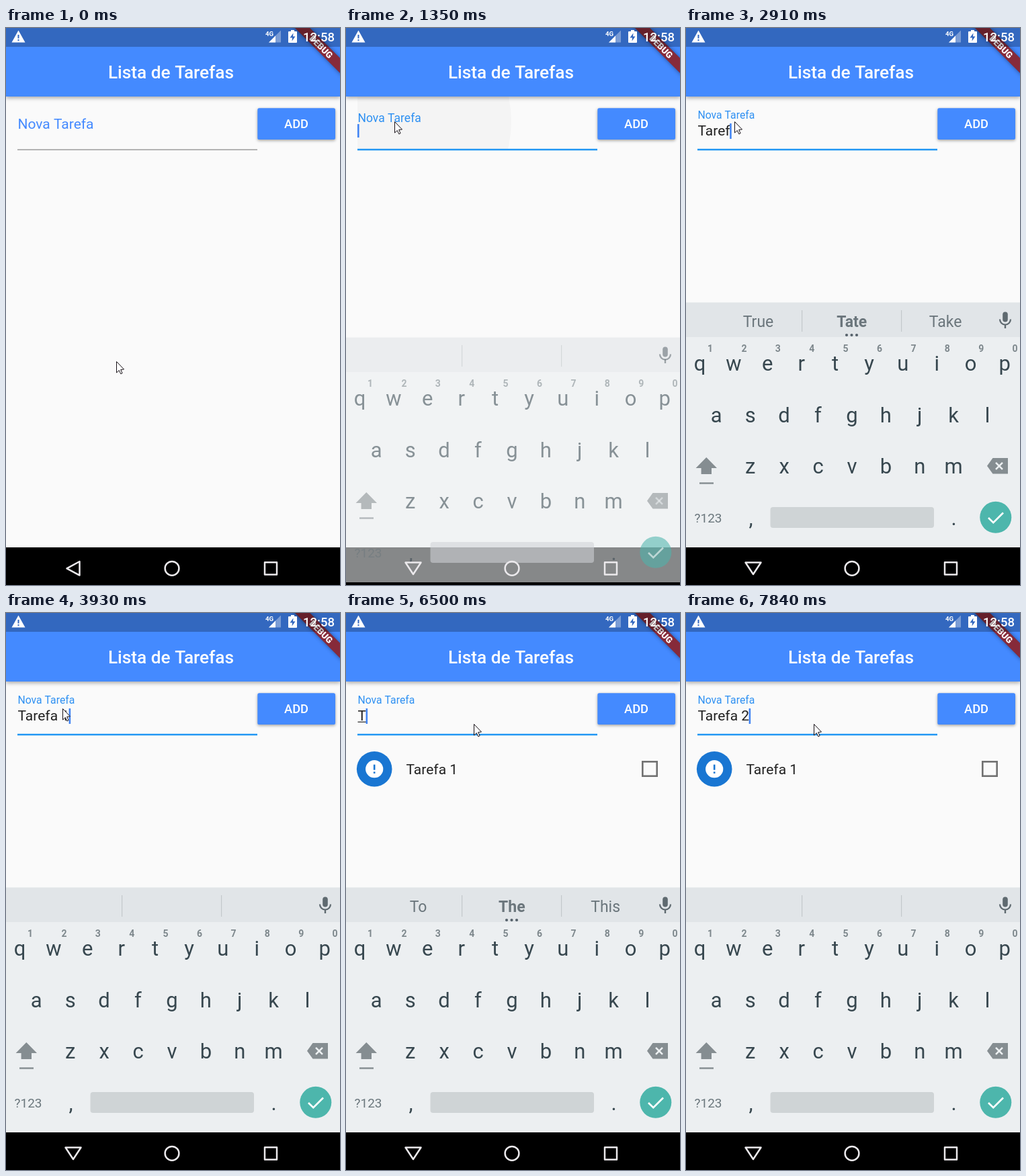
These frames come from a looping animation (497x829 px, 8 s). An HTML page with a canvas:

```html
<!DOCTYPE html>
<html lang="pt">
<head>
<meta charset="utf-8">
<title>Lista de Tarefas</title>
<style>
html, body { margin: 0; width: 100%; height: 100%; overflow: hidden; background: #fafafa; }
canvas { display: block; width: 497px; height: 829px; }
</style>
</head>
<body>
<canvas id="stage"></canvas>
<script>
const W = 497, H = 829, LOOP = 8000;
const canvas = document.getElementById('stage');
const ctx = canvas.getContext('2d');
const dpr = window.devicePixelRatio || 1;
canvas.width = Math.round(W * dpr);
canvas.height = Math.round(H * dpr);

const ACCENT = '#448aff', LINE = '#2196f3', INK = 'rgba(0,0,0,0.87)';
const KEY_INK = '#37474f', KEY_GREY = '#858d91';

// [time, typed text, underlined while composing]
const TYPING = [
  [0, ''], [2360, 'T'], [2440, 'T', 1], [2520, 'Ta', 1], [2680, 'Tar'], [2830, 'Tare'],
  [2910, 'Taref'], [3060, 'Tarefa'], [3230, 'Tarefa', 1], [3300, 'Tarefa '], [3480, 'Tarefa 1'],
  [5110, ''], [6350, 'T'], [6500, 'T', 1], [6670, 'Ta', 1], [6830, 'Tar', 1], [6980, 'Tare', 1],
  [7140, 'Taref', 1], [7290, 'Tarefa', 1], [7600, 'Tarefa '], [7750, 'Tarefa 2']
];
const T_WORDS = 'To The This', TA_WORDS = 'True Tate Take', LAST_WORDS = 'Tarefa Tarda Targets';
const HINTS = [
  [0, ''], [2440, T_WORDS], [2600, TA_WORDS], [3060, 'Tarde Tare Tart'], [3230, LAST_WORDS], [3530, ''],
  [6500, T_WORDS], [6750, TA_WORDS], [7370, LAST_WORDS], [7840, '']
];
const CARET_ON = [[1280, 1660], [2210, 4030], [4530, 4960], [5510, 5890], [6350, LOOP]];
// start, end, steps, target x, target y, dip
const MOVES = [
  [330, 640, 5, 74, 178, 0], [800, 870, 2, 72, 139, 0],
  [3930, 4550, 9, 434, 150, 9], [5510, 5740, 4, 190, 165, 0]
];

const latest = (list, t) => list.filter(e => e[0] <= t).pop();
const mix = (a, b, p) => a + (b - a) * p;
const smooth = p => p * p * (3 - 2 * p);

function stepped(t, start, end, n) {
  if (t < start) return 0;
  return Math.min(n, Math.floor((t - start) / (end - start) * (n - 1) + 1e-6) + 1) / n;
}

function rect(x, y, w, h, fill, r = 0) {
  ctx.fillStyle = fill;
  ctx.beginPath();
  ctx.roundRect(x, y, w, h, r);
  ctx.fill();
}

function disc(x, y, r, fill) {
  ctx.fillStyle = fill;
  ctx.beginPath();
  ctx.arc(x, y, r, 0, Math.PI * 2);
  ctx.fill();
}

function path(points, closed = true) {
  ctx.beginPath();
  for (let i = 0; i < points.length; i += 2) ctx.lineTo(points[i], points[i + 1]);
  if (closed) ctx.closePath();
}

function poly(points, fill) {
  path(points);
  ctx.fillStyle = fill;
  ctx.fill();
}

function line(points, color, width, closed = false) {
  path(points, closed);
  ctx.strokeStyle = color;
  ctx.lineWidth = width;
  ctx.stroke();
}

function text(s, x, y, size, color, weight = 400, align = 'left') {
  ctx.font = `${weight} ${size}px Roboto, sans-serif`;
  ctx.textAlign = align;
  ctx.fillStyle = color;
  ctx.fillText(s, x, y);
}

function shadowed(alpha, blur, dy, draw) {
  ctx.save();
  ctx.shadowColor = `rgba(0,0,0,${alpha})`;
  ctx.shadowBlur = blur * dpr;
  ctx.shadowOffsetY = dy * dpr;
  draw();
  ctx.restore();
}

function banner() {
  ctx.save();
  ctx.translate(W, 0);
  ctx.rotate(Math.PI / 4);
  shadowed(0.5, 6, 0, () => rect(-52, 31.8, 104, 15.4, 'rgba(125,36,53,0.9)'));
  rect(-52, 31.8, 104, 15.4, '#862a3a');
  text('DEBUG', 0, 44.2, 13.2, '#fff', 900, 'center');
  ctx.restore();
}

function header() {
  shadowed(0.35, 6, 2, () => rect(0, 0, W, 102, ACCENT));
  text('Lista de Tarefas', 245.5, 75, 26.2, '#fff', 500, 'center');
  banner();
  rect(0, 0, W, 28, 'rgba(0,0,0,0.25)');

  const bar = '#3367bf';
  poly([18.5, 3.5, 28.5, 21.5, 8.5, 21.5], '#fff');
  rect(17.5, 10, 2, 5.5, bar);
  rect(17.5, 17, 2, 2, bar);
  poly([391, 21.5, 409, 21.5, 409, 3.5], 'rgba(255,255,255,0.35)');
  poly([391, 21.5, 401, 21.5, 401, 11.5], '#fff');
  text('4G', 386, 12, 9.6, '#fff', 700);
  rect(420, 5, 13, 17, '#fff', 1);
  rect(424, 3, 5, 3, '#fff');
  poly([427.5, 7.5, 422.5, 14.5, 426, 14.5, 425.5, 19.5, 430.5, 12.5, 427, 12.5], bar);
  text('12:58', 442, 20, 18.5, '#fff', 500);
}

function ripple(t) {
  if (t < 1040 || t >= 1510) return;
  const r = t < 1110 ? 8 : t < 1280 ? 12 : 174 + (t - 1350) * 1.2;
  ctx.save();
  ctx.beginPath();
  ctx.rect(17, 102, 357, 78);
  ctx.clip();
  disc(72, 139, r, `rgba(0,0,0,${t < 1430 ? 0.022 : 0.011})`);
  ctx.restore();
}

function field(t, now) {
  ripple(now);
  const focused = now >= 1280;
  const p = !focused ? 0 : now < 1350 ? 0.1 : now < 1430 ? 0.66 : now < 1510 ? 0.96 : 1;
  text('Nova Tarefa', 17.5, mix(150, 134.5, p), mix(21, 15.75, p), focused ? '#2e90f2' : ACCENT);
  if (focused) rect(17, 179.8, 357, 2.4, LINE);
  else rect(17, 180.4, 357, 1.3, '#8a8a8a');

  const [, typed, composing] = latest(TYPING, t);
  text(typed, 17.5, 160, 21, INK);
  const width = ctx.measureText(typed).width;
  if (composing) rect(17.5, 161.6, width, 1.2, INK);
  if (CARET_ON.some(([a, b]) => t >= a && t < b)) {
    rect(17 + width, typed ? 142 : 143, 2.6, typed ? 23 : 20, '#4285f4');
  }
}

function button(t) {
  const pressed = t >= 4860 && t < 5190;
  const fill = t >= 4940 && t < 5190 ? '#5595ff' : ACCENT;
  shadowed(pressed ? 0.4 : 0.38, pressed ? 8 : 4, pressed ? 3 : 1.5,
    () => rect(374.3, 119.3, 115.7, 46.7, fill, 2.6));
  text('ADD', 432, 149.3, 18.3, '#fff', 500, 'center');
}

function task() {
  disc(42.2, 232.2, 26.3, '#1976d2');
  disc(42.2, 232.2, 13.1, '#fff');
  rect(40.9, 225.6, 2.6, 8, '#1976d2');
  rect(40.9, 236.2, 2.6, 2.6, '#1976d2');
  text('Tarefa 1', 89.5, 239.5, 21, INK);
  ctx.strokeStyle = '#717171';
  ctx.lineWidth = 2.6;
  ctx.strokeRect(441.3, 221.3, 21.4, 21.4);
}

function mic() {
  const c = '#5f6a70';
  rect(471.2, 422.5, 7.6, 15, c, 3.8);
  ctx.strokeStyle = c;
  ctx.lineWidth = 2.2;
  ctx.beginPath();
  ctx.arc(475, 433.5, 8, 0, Math.PI);
  ctx.stroke();
  rect(473.8, 441, 2.4, 6, c);
}

function keyRow(keys, x, y) {
  [...keys].forEach((k, i) => text(k, x + i * 50.4, y, 31, KEY_INK, 400, 'center'));
}

function hints(t) {
  const words = latest(HINTS, t)[1];
  if (!words) return;
  words.split(' ').forEach((w, i) =>
    text(w, 107.5 + i * 139.3, 445, 23, '#6b767c', i === 1 ? 700 : 400, 'center'));
  for (let i = 0; i < 3; i++) disc(239 + i * 7.5, 457, 2.1, '#55616a');
}

function keyboard(t, now) {
  if (now < 1350) return;
  const q = (1 - Math.min(1, (now - 1280) / 230)) ** 2;
  // a layer would be needed for true group opacity; key ink is close enough
  ctx.save();
  ctx.globalAlpha = 1 - 0.89 * q;
  ctx.translate(0, Math.round(107 * q));
  rect(0, 408.5, W, 52, '#e1e5e8');
  rect(0, 460.5, W, 312.5, '#eceff1');
  rect(172, 420, 1.2, 32, '#c3c8cb');
  rect(320, 420, 1.2, 32, '#c3c8cb');
  mic();
  hints(t);

  keyRow('qwertyuiop', 20.5, 510);
  keyRow('asdfghjkl', 45.3, 586.5);
  keyRow('zxcvbnm', 95.8, 663);
  for (let i = 0; i < 10; i++) {
    text((i + 1) % 10, 36 + i * 50.4, 482, 14, '#7d878c', 700, 'center');
  }

  poly([30.3, 639, 46, 655, 38, 655, 38, 664, 22.6, 664, 22.6, 655, 14.6, 655], KEY_GREY);
  rect(20, 676.3, 21, 2.4, KEY_GREY);
  poly([448, 651.8, 456.5, 640, 479, 640, 479, 663.6, 456.5, 663.6], KEY_GREY);
  line([461, 646.8, 471, 656.8], '#eceff1', 2.6);
  line([471, 646.8, 461, 656.8], '#eceff1', 2.6);

  text('?123', 33, 736, 19, '#6b777d', 400, 'center');
  text(',', 96.5, 740, 31, KEY_INK, 400, 'center');
  text('.', 398.5, 740, 31, KEY_INK, 400, 'center');
  rect(125.5, 713, 243.5, 31, '#cfd4d6', 4);
  disc(460.8, 728.3, 23.5, '#4db6ac');
  line([450, 729, 457.3, 736.2, 472, 721.5], '#fff', 2.7);
  ctx.restore();
}

function navIcons(now) {
  const c = '#ebe9ec';
  ctx.lineJoin = 'round';
  line(now < 1350 ? [90.5, 804.3, 109.5, 794, 109.5, 814.6]
    : [88.5, 795.5, 111.5, 795.5, 100, 813], c, 2.5, true);
  ctx.beginPath();
  ctx.arc(247, 804.3, 10.4, 0, Math.PI * 2);
  ctx.stroke();
  line([385, 795.3, 403, 795.3, 403, 813.5, 385, 813.5], c, 2.5, true);
  ctx.lineJoin = 'miter';
}

function pointer(t) {
  let x = 164, y = 496;
  for (const [start, end, n, toX, toY, dip] of MOVES) {
    const p = stepped(t, start, end, n), e = smooth(p);
    x = mix(x, toX, e);
    y = mix(y, toY, e) + dip * Math.sin(Math.PI * p);
  }
  ctx.save();
  ctx.translate(Math.round(x) + 0.5, Math.round(y) + 0.5);
  const arrow = [0, 0, 0, 16.5, 3.8, 13, 6.3, 18.3, 8.6, 17.2, 6.2, 12, 11, 11.5];
  poly(arrow, '#fff');
  line(arrow, '#161016', 1, true);
  ctx.restore();
}

function draw(t) {
  const now = t >= 1280 && t < 1510 ? [1280, 1350, 1430].filter(s => s <= t).pop() : t;
  ctx.setTransform(dpr, 0, 0, dpr, 0, 0);
  rect(0, 0, W, H, '#fafafa');
  field(t, now);
  header();
  button(t);
  if (t >= 5110) task();
  rect(0, 773, W, 56, '#000');
  keyboard(t, now);
  navIcons(now);
  pointer(t);
}

const begin = performance.now();
function frame() {
  draw((performance.now() - begin) % LOOP);
  requestAnimationFrame(frame);
}
frame();
</script>
</body>
</html>
```
